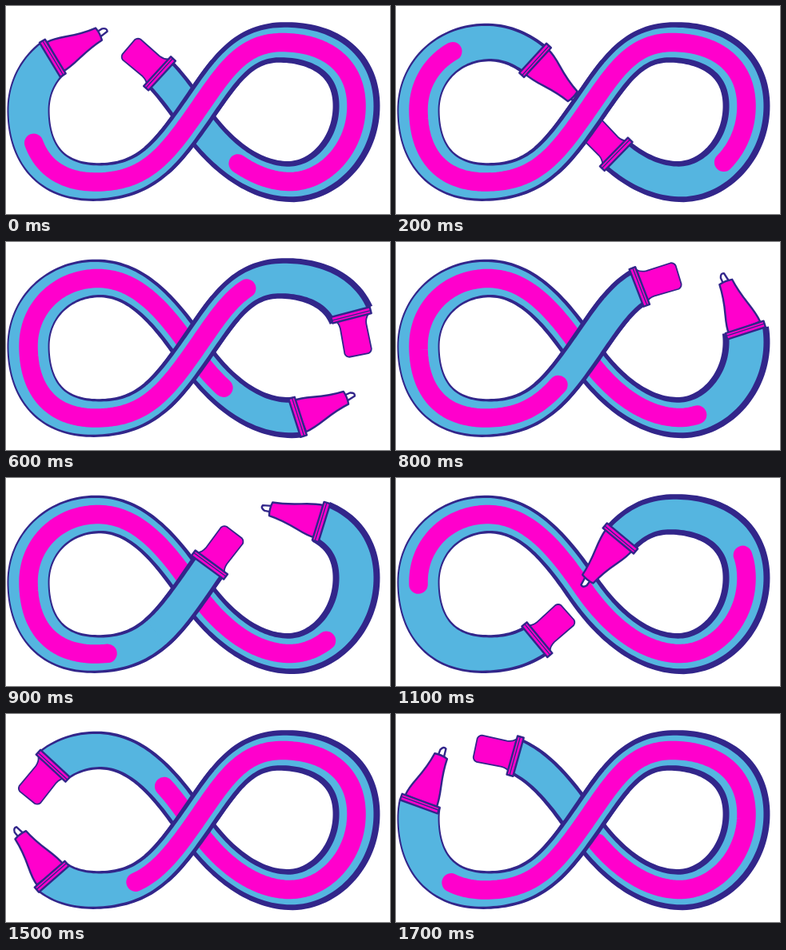
An HTML page with a canvas that plays this animation: 480 px wide and 260 px high, repeating every 2.7 s.

```html
<!DOCTYPE html>
<html lang="en">
<head>
<meta charset="utf-8">
<title>Endless marker</title>
<style>
  html, body { margin: 0; width: 100%; height: 100%; overflow: hidden; background: #fff; }
  canvas { display: block; width: 480px; height: 260px; }
</style>
</head>
<body>
<canvas id="stage" width="480" height="260"></canvas>
<script>
const ctx = document.getElementById('stage').getContext('2d');
const NAVY = '#32268a', BLUE = '#55b5e0', PINK = '#ff00cc';

// Figure eight in travel order, starting at the far left
const track = document.createElementNS('http://www.w3.org/2000/svg', 'path');
track.setAttribute('d', `M28 130 C28 82 66 45.5 115 45.5 S199 87 234 138
  S312 219.5 355 219.5 S438 178 438 125 S398 45.5 345 45.5
  S270 87 234 138 S172 220 112 220 S28 180 28 130`);
const LOOP = track.getTotalLength();
const UNDER = LOOP * 0.252, OVER = LOOP * 0.749; // the two passes of the crossing

const pointAt = len => track.getPointAtLength(((len % LOOP) + LOOP) % LOOP);

// Share of the lap covered at each 100 ms step
const TRAVEL = [[0, 0], [6, 0.337], [9, 0.525], [11, 0.63], [13, 0.79], [17, 0.954], [18, 1]];

function travel(step) {
  const i = TRAVEL.findIndex(k => k[0] > step);
  const [s0, p0] = TRAVEL[i - 1], [s1, p1] = TRAVEL[i];
  return p0 + (p1 - p0) * (step - s0) / (s1 - s0);
}

const bump = (x, mid, width) => Math.exp(-(((x - mid) / width) ** 2));

function poseAt(step) {
  const p = travel(step);
  const tail = 224 + p * LOOP;
  return {
    tail,
    nib: tail + LOOP - 150 - 16 * Math.sin(Math.PI * p),
    inkStart: tail + 150 + 57 * bump(p, 0.66, 0.15),
    inkStop: tail + LOOP - 266 - 100 * bump(p, 0.58, 0.11)
  };
}

function samples(from, to) {
  const n = Math.max(1, Math.ceil((to - from) / 4));
  return Array.from({ length: n + 1 }, (_, i) => from + (to - from) * i / n);
}

// The barrel is widest at the far left; its outline thickens to the right
function band(from, to, color, outlined) {
  const left = [], right = [];
  for (const len of samples(from, to)) {
    const p = pointAt(len), a = pointAt(len - 1), b = pointAt(len + 1);
    const angle = Math.atan2(b.y - a.y, b.x - a.x);
    const d = (p.x - 234) / 205;
    const half = 18 - 1.5 * d + 5 * d * d + (outlined ? 5 + 3 * d : 0);
    const nx = Math.sin(angle) * half, ny = -Math.cos(angle) * half;
    left.push([p.x + nx, p.y + ny]);
    right.unshift([p.x - nx, p.y - ny]);
  }
  ctx.fillStyle = color;
  ctx.beginPath();
  left.concat(right).forEach(q => ctx.lineTo(...q));
  ctx.fill();
}

function ink(from, to) {
  ctx.strokeStyle = PINK;
  ctx.lineWidth = 23.5;
  ctx.lineCap = ctx.lineJoin = 'round';
  ctx.beginPath();
  samples(from, to).forEach(len => { const p = pointAt(len); ctx.lineTo(p.x, p.y); });
  ctx.stroke();
}

function barrel(pose, from, to) {
  const a = Math.max(from, pose.tail), b = Math.min(to, pose.nib);
  if (b <= a) return;
  band(a, b, NAVY, true);
  band(a - 1, b + 1, BLUE, false);
  const c = Math.max(a, pose.inkStart), d = Math.min(b, pose.inkStop);
  if (d > c) ink(c, d);
}

function shape(d, fill, width) {
  const path = new Path2D(d);
  ctx.fillStyle = fill;
  ctx.fill(path);
  ctx.strokeStyle = NAVY;
  ctx.lineWidth = width;
  ctx.lineJoin = 'round';
  ctx.stroke(path);
}

// Aims a part at the point of the track that lies `reach` away
function place(len, reach, draw) {
  const p = pointAt(len), q = pointAt(len + reach);
  ctx.save();
  ctx.translate(p.x, p.y);
  ctx.rotate(Math.atan2(q.y - p.y, q.x - p.x));
  draw();
  ctx.restore();
}

function collar() {
  shape('M-4 -25 H4 V25 H-4 Z', PINK, 2.4);
  shape('M0.5 -25 V25', PINK, 1.4);
}

function cone() {
  shape('M63 -3.5 L72 -4 Q78 -2 76 2 L65 4 Z', '#fff', 2.4);
  shape('M3 -21 C22 -21 32 -11 65 -8.5 Q67 0 65 8.5 C36 11 24 20 3 21 Z', PINK, 2.4);
}

function plug() {
  shape('M3 -21 Q7 -17 14 -16.5 L46 -17 Q50 -16 51 -12 V12 Q50 16 46 17 L14 16.5 Q7 17 3 21 Z', PINK, 1.8);
}

function tip(len, side, draw) {
  place(len, 35 * side, draw);
  place(len, 24 * side, collar);
}

const isUnder = len => Math.abs(len % LOOP - UNDER) < 120;

function render(step) {
  const pose = poseAt(step);
  const tips = under => {
    if (isUnder(pose.tail) === under) tip(pose.tail, -1, plug);
    if (isUnder(pose.nib) === under) tip(pose.nib, 1, cone);
  };
  ctx.clearRect(0, 0, 480, 260);
  barrel(pose, pose.tail, pose.nib);
  tips(true);
  for (const lap of [0, LOOP]) barrel(pose, OVER + lap - 70, OVER + lap + 70);
  tips(false);
}

let shown = -1;
function tick() {
  const step = Math.min(17, Math.floor(performance.now() % 2700 / 100));
  if (step !== shown) render(shown = step);
  requestAnimationFrame(tick);
}
tick();
</script>
</body>
</html>
```
